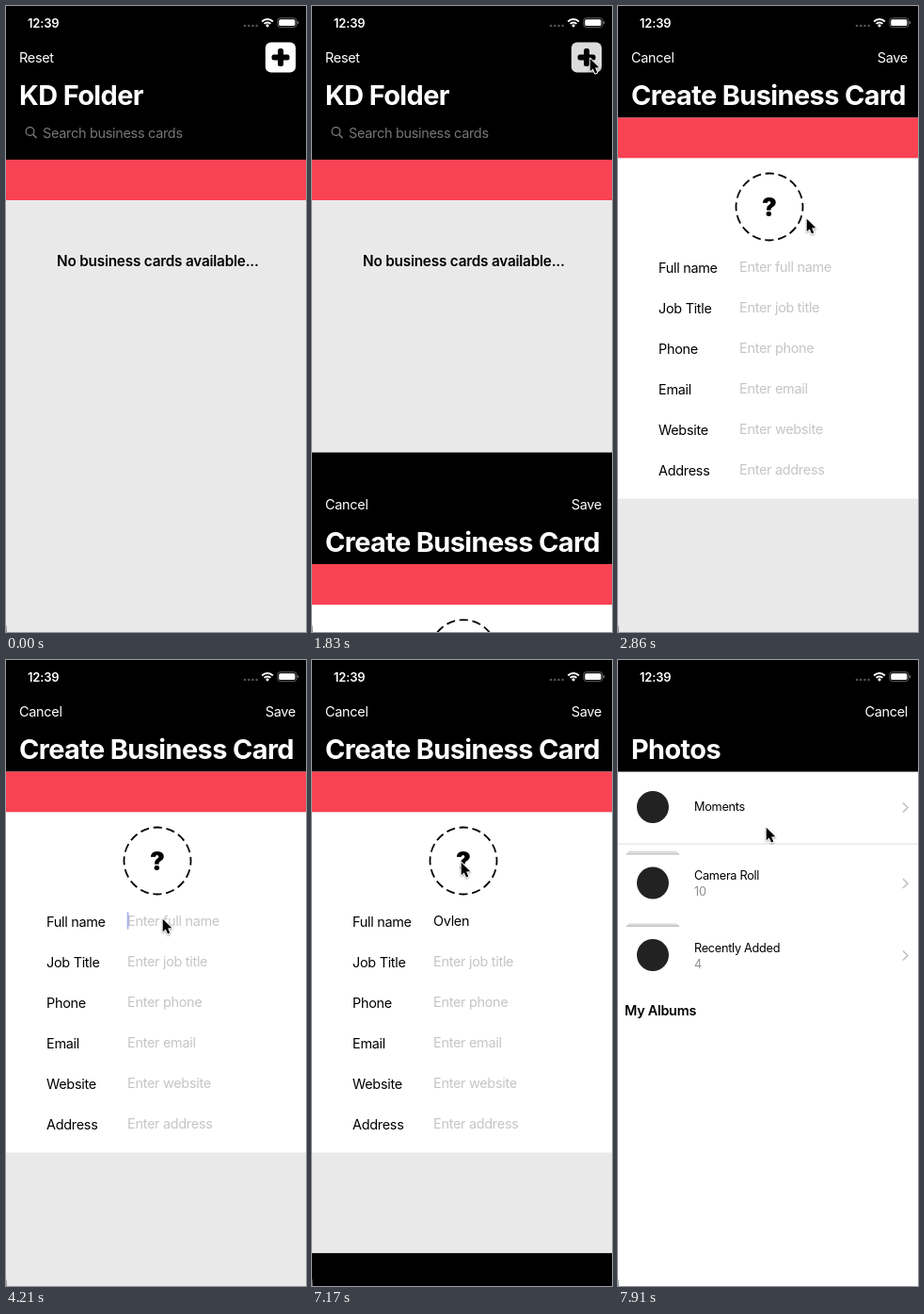
An HTML page with a canvas for the animation above (8000 ms loop, 319 by 664 pixels).

```html
<!DOCTYPE html>
<html lang="en">
<head>
<meta charset="utf-8">
<title>Card holder demo</title>
<style>
html, body { margin: 0; width: 100%; height: 100%; overflow: hidden; background: #000; }
canvas { display: block; width: 319px; height: 664px; }
</style>
</head>
<body>
<canvas id="stage"></canvas>
<script>
const W = 319, H = 664, LOOP = 8000;
const START = 486, TICK = 148.2;
const RED = '#f94253', GREY = '#e9e9e9';
const NAME = 'Ovlen';
const FIELDS = [
  ['Full name', 'Enter full name'], ['Job Title', 'Enter job title'],
  ['Phone', 'Enter phone'], ['Email', 'Enter email'],
  ['Website', 'Enter website'], ['Address', 'Enter address']
];
// Pointer path: tick, x, y
const PATH = [
  [0, 301, 234], [1, 298, 200], [2, 291, 150], [3, 286, 105], [4, 288, 75], [5, 293, 59], [6, 295, 55],
  [12, 295, 55], [13, 285, 80], [14, 262, 125], [15, 230, 175], [16, 200, 225], [17, 180, 257], [18, 169, 271],
  [19, 166, 274], [36, 166, 274], [37, 170, 283], [38, 172, 287], [39, 169, 268], [40, 162, 233], [41, 158, 214],
  [46, 158, 214], [47, 158, 206], [48, 157, 188], [49, 157, 177]
];

const canvas = document.getElementById('stage');
const ctx = canvas.getContext('2d');
const dpr = window.devicePixelRatio || 1;
canvas.width = W * dpr;
canvas.height = H * dpr;

function rect(x, y, w, h, color) {
  ctx.fillStyle = color;
  ctx.fillRect(x, y, w, h);
}

function roundRect(x, y, w, h, r, color) {
  ctx.fillStyle = color;
  ctx.beginPath();
  ctx.roundRect(x, y, w, h, r);
  ctx.fill();
}

function disc(x, y, r, color) {
  ctx.fillStyle = color;
  ctx.beginPath();
  ctx.arc(x, y, r, 0, Math.PI * 2);
  ctx.fill();
}

function stroke(points, color, width) {
  ctx.strokeStyle = color;
  ctx.lineWidth = width;
  ctx.beginPath();
  points.forEach(([x, y]) => ctx.lineTo(x, y));
  ctx.stroke();
}

function text(str, x, y, color, { size = 14.46, weight = 400, spacing = -0.3, align = 'left' } = {}) {
  ctx.font = `${weight} ${size}px Inter, "Noto Sans", sans-serif`;
  ctx.letterSpacing = spacing + 'px';
  ctx.textAlign = align;
  ctx.fillStyle = color;
  ctx.fillText(str, x, y);
  return ctx.measureText(str).width;
}

const title = str => text(str, 14, 105, '#fff', { size: 28.9, weight: 700, spacing: -0.6 });
const rightButton = str => text(str, 308, 60, '#fff', { align: 'right' });

function drawList(k) {
  rect(0, 0, W, H, GREY);
  rect(0, 0, W, 163, '#000');
  rect(0, 163, W, 43, RED);
  text('Reset', 14, 60, '#fff');
  title('KD Folder');

  roundRect(275.8, 38.6, 32.2, 32, 6, k >= 8 ? '#dcdcdc' : '#fff');
  roundRect(282.5, 51.6, 19, 6, 2.5, '#000');
  roundRect(289, 45.1, 6, 19, 2.5, '#000');

  ctx.strokeStyle = '#808084';
  ctx.lineWidth = 1.2;
  ctx.beginPath();
  ctx.arc(25.5, 133, 4.4, 0, Math.PI * 2);
  ctx.stroke();
  stroke([[28.7, 136.2], [32.5, 140]], '#808084', 1.4);
  text('Search business cards', 39, 139.5, '#77777b');
  text('No business cards available...', 54, 276, '#000', { size: 15.3, weight: 600, spacing: -0.2 });
}

function caretAlpha(k) {
  if (k < 21 || k === 26 || k === 27 || k >= 37) return 0;
  return k === 25 ? 0.5 : 1;
}

function drawForm(k) {
  rect(0, 0, W, H + 2, GREY);
  rect(0, 0, W, 118.5, '#000');
  rect(0, 118.5, W, 43, RED);
  rect(0, 161.5, W, 361, '#fff');
  text('Cancel', 14, 60, '#fff');
  rightButton('Save');
  title('Create Business Card');

  // Dashed avatar ring with one dash centred at the top
  ctx.save();
  ctx.strokeStyle = '#000';
  ctx.lineWidth = 1.8;
  const dash = 2 * Math.PI * 35.5 / 16;
  ctx.setLineDash([dash * 0.66, dash * 0.34]);
  ctx.lineDashOffset = dash * 0.33;
  ctx.beginPath();
  ctx.arc(161, 213, 35.5, 0, Math.PI * 2);
  ctx.stroke();
  ctx.restore();
  text('?', 161, 222.5, '#000', { size: 26.5, weight: 900, spacing: 0, align: 'center' });

  const typed = k < 28 ? 0 : k < 31 ? 1 : Math.min(NAME.length, k - 29);
  let caretX = 128.7;
  FIELDS.forEach(([label, hint], i) => {
    const y = 282 + i * 43;
    text(label, 43, y + 1, '#000');
    if (i === 0 && typed) caretX = 129 + text(NAME.slice(0, typed), 129, y, '#000');
    else text(hint, 129, y, '#c5c5c7');
  });
  ctx.globalAlpha = caretAlpha(k);
  rect(caretX, 267.5, 1.7, 18, '#4a5fe0');
  ctx.globalAlpha = 1;
}

function drawAlbum(name, count, y) {
  const small = { size: 12.75 };
  disc(37, y, 17, '#222');
  if (count) {
    rect(11, y - 33.5, 52, 1.2, '#d2d2d2');
    rect(9, y - 31.8, 56, 1.8, '#c4c4c4');
    text(name, 81, y - 3.5, '#000', small);
    text(count, 81, y + 13.5, '#8e8e93', small);
  } else {
    text(name, 81, y + 4, '#000', small);
  }
  stroke([[303, y - 4.5], [308, y + 0.5], [303, y + 5.5]], '#c2c2c6', 1.6);
}

function drawPhotos() {
  rect(0, 0, W, H + 2, '#fff');
  rect(0, 0, W, 118.5, '#000');
  rightButton('Cancel');
  title('Photos');
  drawAlbum('Moments', '', 156);
  rect(0, 194.5, W, 1, '#dedede');
  drawAlbum('Camera Roll', '10', 236.5);
  drawAlbum('Recently Added', '4', 313);
  text('My Albums', 7, 377, '#000', { weight: 600 });
}

function drawStatus() {
  text('12:39', 23, 22.5, '#fff', { size: 13, weight: 600, spacing: -0.2 });
  for (let i = 0; i < 4; i++) disc(254 + i * 4.2, 21, 1.3, '#555');
  ctx.strokeStyle = '#fff';
  ctx.lineWidth = 2;
  [4.8, 8.2].forEach(r => {
    ctx.beginPath();
    ctx.arc(278, 22.3, r, -Math.PI * 0.75, -Math.PI * 0.25);
    ctx.stroke();
  });
  disc(278, 20.8, 1.6, '#fff');
  ctx.lineWidth = 0.8;
  ctx.strokeStyle = '#777';
  ctx.beginPath();
  ctx.roundRect(288.8, 12.8, 20, 9.6, 2.6);
  ctx.stroke();
  roundRect(290.2, 14.2, 17.2, 6.8, 1.5, '#fff');
  roundRect(309.7, 16, 1.3, 3.2, 0.6, '#777');
}

function drawPointer(k) {
  if (k < 0) return;
  let i = PATH.findIndex(p => p[0] >= k);
  if (i < 0) i = PATH.length - 1;
  const b = PATH[i], a = PATH[Math.max(0, i - 1)];
  const u = b[0] > a[0] ? Math.min(1, (k - a[0]) / (b[0] - a[0])) : 1;
  ctx.save();
  ctx.translate(a[1] + (b[1] - a[1]) * u, a[2] + (b[2] - a[2]) * u);
  ctx.beginPath();
  [[0.7, 0.7], [0.7, 14.2], [3.8, 11.4], [6, 16.6], [8.3, 15.6], [6.1, 10.6], [10.3, 10.3]]
    .forEach(([x, y]) => ctx.lineTo(x, y));
  ctx.closePath();
  ctx.shadowColor = 'rgba(0,0,0,.35)';
  ctx.shadowBlur = 2 * dpr;
  ctx.shadowOffsetY = dpr;
  ctx.strokeStyle = '#fff';
  ctx.lineWidth = 1.8;
  ctx.lineJoin = 'round';
  ctx.stroke();
  ctx.shadowColor = 'transparent';
  ctx.fillStyle = '#000';
  ctx.fill();
  ctx.restore();
}

// Critically damped slide from the bottom edge
function sheet(time, begin, draw) {
  if (time < begin) return;
  const a = (time - begin) * 0.0174;
  ctx.save();
  ctx.translate(0, H * (1 + a) * Math.exp(-a));
  draw();
  ctx.restore();
}

function render() {
  const t = performance.now() % LOOP;
  const k = Math.floor((t - START) / TICK);
  const held = START + k * TICK;
  ctx.setTransform(dpr, 0, 0, dpr, 0, 0);
  drawList(k);
  sheet(held, 1758.8, () => drawForm(k));
  sheet(held, 7134, drawPhotos);
  drawStatus();
  stroke([[0, 657], [0.6, 664]], '#777', 0.8);
  drawPointer(k);
  requestAnimationFrame(render);
}
render();
</script>
</body>
</html>
```
